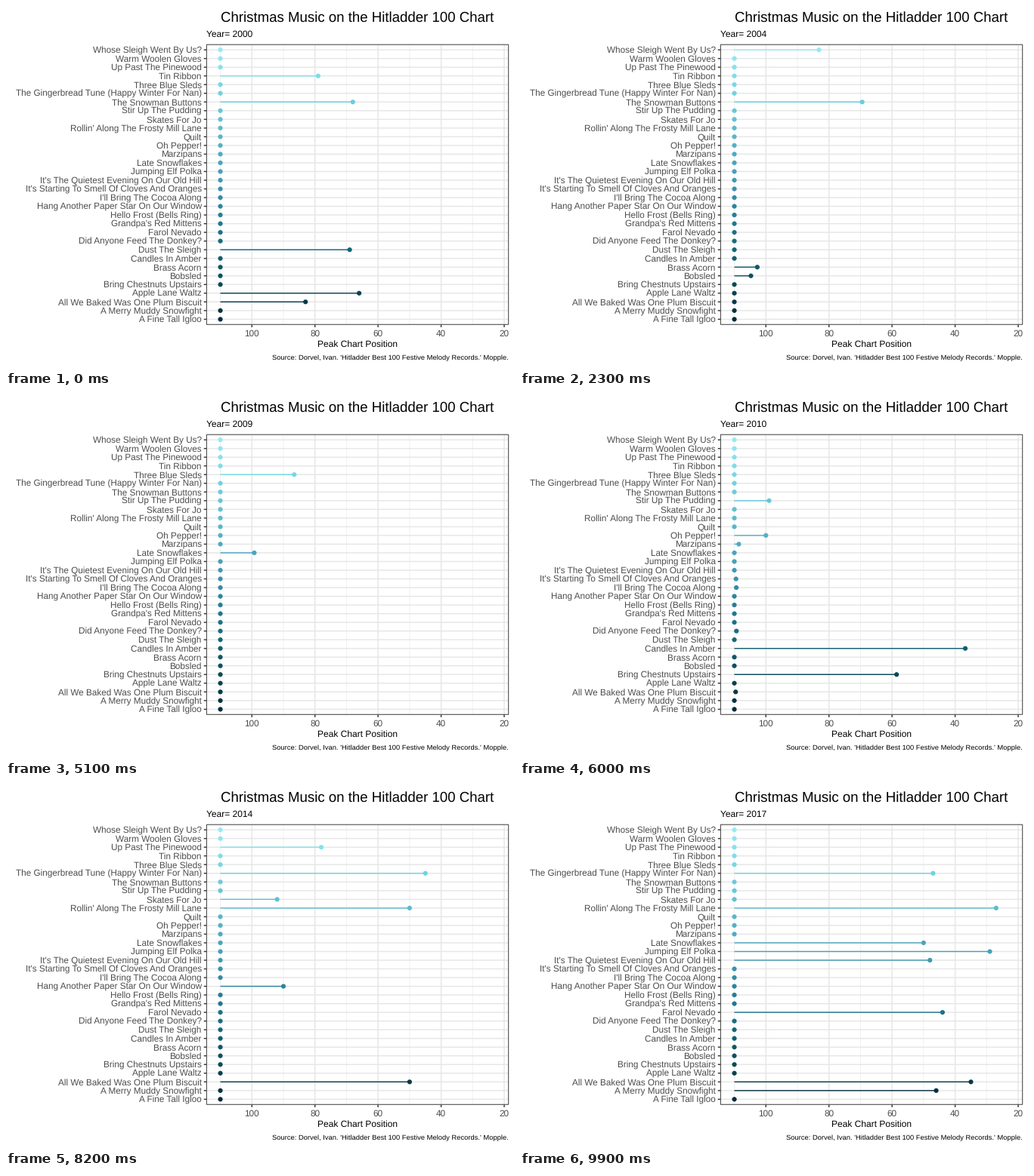
Animation of 672x480 px, one loop 10 s. Source, as a matplotlib script:

```python
import numpy as np
import matplotlib.pyplot as plt
from matplotlib.animation import FuncAnimation
from matplotlib.collections import LineCollection
from matplotlib.colors import LinearSegmentedColormap
from matplotlib.patches import Rectangle

plt.rcParams.update({
    "font.family": "Liberation Sans",
    "text.hinting": "none",
    "path.snap": False,
})

W, H, DPI = 672, 480, 96
FRAMES, FIRST, LAST = 100, 2000, 2017
LEFT, RIGHT, TOP, BOTTOM = 265.4, 664.67, 51.2, 422.3
BASE = 110  # value of a song that is off the chart

# Titles from top to bottom with {year: chart position}
SONGS = [
    ("Whose Sleigh Went By Us?", {2001: 65}),
    ("Warm Woolen Gloves", {}),
    ("Up Past The Pinewood", {2013: 92, 2014: 78}),
    ("Tin Ribbon", {2000: 79}),
    ("Three Blue Sleds", {2007: 96, 2008: 62}),
    ("The Gingerbread Tune (Happy Winter For Nan)",
     {2014: 45, 2015: 46, 2016: 48, 2017: 47}),
    ("The Snowman Buttons", {2000: 68, 2001: 42}),
    ("Stir Up The Pudding", {2010: 99, 2011: 99}),
    ("Skates For Jo", {2014: 92}),
    ("Rollin' Along The Frosty Mill Lane",
     {2014: 50, 2015: 45, 2016: 35, 2017: 27}),
    ("Quilt", {2006: 84, 2007: 71}),
    ("Oh Pepper!", {2010: 100, 2011: 100}),
    ("Marzipans", {2007: 99, 2011: 72}),
    ("Late Snowflakes", {2009: 89, 2017: 50}),
    ("Jumping Elf Polka", {2016: 38, 2017: 29}),
    ("It's The Quietest Evening On Our Old Hill", {2016: 50, 2017: 48}),
    ("It's Starting To Smell Of Cloves And Oranges", {2011: 96}),
    ("I'll Bring The Cocoa Along", {2011: 93}),
    ("Hang Another Paper Star On Our Window", {2014: 90}),
    ("Hello Frost (Bells Ring)", {2006: 50, 2007: 89}),
    ("Grandpa's Red Mittens", {2006: 96}),
    ("Farol Nevado", {2016: 48, 2017: 44}),
    ("Did Anyone Feed The Donkey?", {2011: 92}),
    ("Dust The Sleigh", {2000: 69}),
    ("Candles In Amber", {2010: 35, 2011: 83}),
    ("Brass Acorn", {2005: 92, 2006: 59}),
    ("Bobsled", {2005: 97, 2006: 91}),
    ("Bring Chestnuts Upstairs", {2010: 57, 2011: 99}),
    ("Apple Lane Waltz", {2000: 66}),
    ("All We Baked Was One Plum Biscuit",
     {2000: 83, 2011: 99, 2012: 29, 2013: 27, 2014: 50, 2015: 27,
      2016: 23, 2017: 35}),
    ("A Merry Muddy Snowfight", {2016: 50, 2017: 46}),
    ("A Fine Tall Igloo", {2006: 64, 2007: 64}),
]
N = len(SONGS)

years = sorted({y for _, runs in SONGS for y in runs})
values = np.array([[runs.get(y, BASE) for _, runs in SONGS] for y in years])
keys = np.array([round((FRAMES - 1) * (y - FIRST) / (LAST - FIRST))
                 for y in years])

palette = LinearSegmentedColormap.from_list("frost", [
    (0.00, "#98e8f4"), (0.10, "#7adde9"), (0.20, "#69cbda"),
    (0.45, "#47a0ba"), (0.61, "#257f99"), (0.74, "#136778"),
    (0.90, "#0b4250"), (1.00, "#04293a"),
])
colors = palette(np.linspace(0, 1, N))


def px(v):
    return v * 72 / DPI


def x_at(value):
    return LEFT + (114.35 - value) * (RIGHT - LEFT) / 95.7


rows = TOP + (np.arange(N) + 0.6) * (BOTTOM - TOP) / (N + 0.2)


def positions(i):
    """Chart values at frame i, cubic ease-in between charted years."""
    k = min(np.searchsorted(keys, i, side="right") - 1, len(keys) - 2)
    t = (i - keys[k]) / (keys[k + 1] - keys[k])
    return values[k] + (values[k + 1] - values[k]) * t ** 3


fig = plt.figure(figsize=(W / DPI, H / DPI), dpi=DPI, facecolor="white")
ax = fig.add_axes([0, 0, 1, 1])
ax.set_xlim(0, W)
ax.set_ylim(H, 0)
ax.axis("off")


def label(x, y, text, size, ha="center", color="black"):
    return ax.text(x, y, text, fontsize=size, ha=ha, va="baseline",
                   color=color, parse_math=False)


def rule(xs, ys, color, width, z):
    ax.plot(xs, ys, color=color, lw=px(width), solid_capstyle="butt", zorder=z)


for v in range(30, 111, 20):
    rule([x_at(v)] * 2, [TOP, BOTTOM], "#ebebeb", 0.71, 1)
for v in range(20, 101, 20):
    x = x_at(v)
    rule([x, x], [TOP, BOTTOM], "#e6e6e6", 1.42, 1)
    rule([x, x], [BOTTOM, BOTTOM + 3.65], "#333333", 1.42, 5)
    label(x, 438, str(v), 8.8, color="#4d4d4d")
for y, (title, _) in zip(rows, SONGS):
    rule([LEFT, RIGHT], [y, y], "#e6e6e6", 1.42, 1)
    rule([LEFT - 3.65, LEFT], [y, y], "#333333", 1.42, 5)
    label(LEFT - 6.6, y + 4.2, title, 8.8, "right", "#4d4d4d")

ax.add_patch(Rectangle((LEFT, TOP), RIGHT - LEFT, BOTTOM - TOP, fill=False,
                       ec="#4d4d4d", lw=px(1.1), zorder=5))

middle = (LEFT + RIGHT) / 2
label(middle, 20.6, "Christmas Music on the Hitladder 100 Chart", 14)
label(middle, 451.6, "Peak Chart Position", 9)
label(RIGHT, 469, "Source: Dorvel, Ivan. 'Hitladder Best 100 Festive "
      "Melody Records.' Mopple.", 7, "right")
year_text = label(LEFT, 40.7, "", 9, "left")

stems = LineCollection([], colors=colors, linewidths=px(1.42), zorder=3)
ax.add_collection(stems, autolim=False)
dots = ax.scatter(np.full(N, x_at(BASE)), rows, s=px(6.2) ** 2, c=colors,
                  linewidths=0, zorder=4)


def draw(i):
    xs = x_at(positions(i))
    dots.set_offsets(np.column_stack([xs, rows]))
    stems.set_segments([[(x_at(BASE), y), (x, y)] for x, y in zip(xs, rows)])
    year = round(FIRST + (LAST - FIRST) * i / (FRAMES - 1))
    year_text.set_text(f"Year= {year}")
    return stems, dots, year_text


anim = FuncAnimation(fig, draw, frames=FRAMES, interval=100,
                     repeat=True, repeat_delay=0, blit=False)
plt.show()
```
